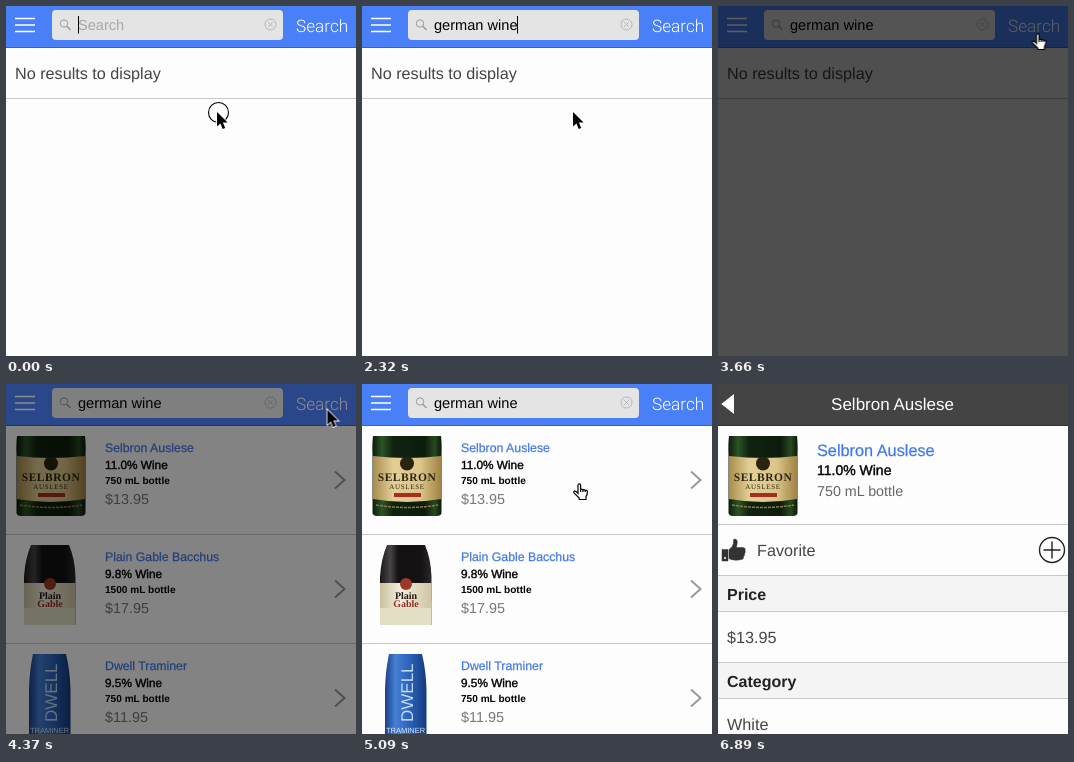
Animation, 350 px wide and 350 px high, one loop 7.92 s. Source, as an HTML page:

```html
<!DOCTYPE html>
<html lang="en">
<head>
<meta charset="utf-8">
<title>Wine search</title>
<style>
html, body { margin: 0; width: 100%; height: 100%; overflow: hidden; background: #fdfdfd; }
svg { display: block; width: 100vw; height: 100vh; }
text { font-family: "Liberation Sans", Arial, sans-serif; text-rendering: geometricPrecision; white-space: pre; }
.serif { font-family: "Liberation Serif", "Noto Serif", serif; }
.light { font: 300 17.2px Roboto, "Liberation Sans", sans-serif; fill: #fff; }
.field { font-size: 14.6px; }
.body { font-size: 16.2px; fill: #444; }
.head { font-size: 16px; font-weight: 700; fill: #222; }
.name { font-size: 12.3px; fill: #4379e8; stroke: #4379e8; stroke-width: .25px; }
.kind { font-size: 11.8px; fill: #000; stroke: #000; stroke-width: .4px; }
.size { font-size: 10.1px; font-weight: 700; }
.price { font-size: 14.4px; fill: #777; }
.rule { stroke: #c9c9c9; }

/* every track shares one 7920 ms clock */
.t { animation: 7920ms step-end infinite; }
.press { animation-name: press; }
.hint { animation-name: hint; }
.edit { animation-name: edit; }
.caret { animation-name: caret; }
.results { animation-name: results; }
.active { animation-name: active; }
.dim { animation-name: dim; }
.app { animation-name: app; }
.detail { animation-name: detail; }
.pointer { animation-name: pointer; }
.hand { animation-name: hand; }
.arrow { animation-name: arrow; }

@keyframes press { 0% { opacity: 1 } 1.13%, 100% { opacity: 0 } }
@keyframes hint { 0% { opacity: 1 } 6.69%, 100% { opacity: 0 } }
@keyframes caret {
  0% { opacity: 1 } 3.4% { opacity: 0 } 6.69% { opacity: 1 }
  34.95%, 100% { opacity: 0 }
}
@keyframes edit {
  0% { transform: none }
  6.69% { transform: translateX(8px) }
  8.96% { transform: translateX(16px) }
  11.23% { transform: translateX(21px) }
  12.37% { transform: translateX(33px) }
  18.05% { transform: translateX(41px) }
  20.32% { transform: translateX(49px) }
  22.6% { transform: translateX(53px) }
  24.87% { transform: translateX(64px) }
  25.88% { transform: translateX(67px) }
  27.01% { transform: translateX(75px) }
  29.29%, 100% { transform: translateX(83px) }
}
@keyframes dim {
  0% { opacity: 0 }
  43.9% { opacity: .36 } 45.05% { opacity: .72 } 46.2% { opacity: 1 }
  55.16% { opacity: .7 } 56.3% { opacity: .4 } 57.44% { opacity: .16 }
  58.56%, 100% { opacity: 0 }
}
@keyframes results { 0% { opacity: 0 } 55.16%, 100% { opacity: 1 } }
@keyframes active { 0% { opacity: 0 } 68.8%, 100% { opacity: 1 } }
@keyframes app {
  0% { transform: none }
  71.07% { transform: translateX(-5px) }
  72.21% { transform: translateX(-18px) }
  73.34% { transform: translateX(-46px) }
  74.48%, 100% { transform: translateX(-59px) }
}
@keyframes detail {
  0% { transform: translateX(360px) }
  71.07% { transform: translateX(322px) }
  72.21% { transform: translateX(243px) }
  73.34% { transform: translateX(75px) }
  74.48%, 100% { transform: none }
}
@keyframes pointer {
  0% { transform: translate(211px, 106px) }
  34.95% { transform: translate(211px, 106px); animation-timing-function: steps(9, start) }
  45% { transform: translate(321.5px, 26px) }
  58.56% { transform: translate(321.5px, 26px); animation-timing-function: steps(6, start) }
  65.38% { transform: translate(219px, 98px) }
  77.88% { transform: translate(219px, 98px); animation-timing-function: steps(9, start) }
  87.93%, 100% { transform: translate(360px, 360px) }
}
@keyframes hand {
  0% { opacity: 0 } 42.7% { opacity: 1 } 50.62% { opacity: 0 }
  59.68% { opacity: 1 } 77.88%, 100% { opacity: 0 }
}
@keyframes arrow {
  0% { opacity: 1 } 42.7% { opacity: 0 } 50.62% { opacity: 1 }
  59.68% { opacity: 0 } 77.88%, 100% { opacity: 1 }
}
</style>
</head>
<body>
<svg viewBox="0 0 350 350">
  <defs>
    <linearGradient id="green">
      <stop offset="0" stop-color="#0c1a0c"/><stop offset=".14" stop-color="#2c5426"/>
      <stop offset=".3" stop-color="#10230f"/><stop offset=".75" stop-color="#0d1c0d"/>
      <stop offset=".9" stop-color="#27491f"/><stop offset="1" stop-color="#0c170b"/>
    </linearGradient>
    <linearGradient id="gold">
      <stop offset="0" stop-color="#a98c4c"/><stop offset=".3" stop-color="#e2cf96"/>
      <stop offset=".7" stop-color="#dcc588"/><stop offset="1" stop-color="#a08344"/>
    </linearGradient>
    <linearGradient id="black">
      <stop offset="0" stop-color="#1a1718"/><stop offset=".2" stop-color="#4b4546"/>
      <stop offset=".35" stop-color="#151213"/><stop offset=".8" stop-color="#151213"/>
      <stop offset="1" stop-color="#2d292a"/>
    </linearGradient>
    <linearGradient id="cream">
      <stop offset="0" stop-color="#c9c0a0"/><stop offset=".4" stop-color="#f3eedc"/>
      <stop offset="1" stop-color="#cfc5a3"/>
    </linearGradient>
    <linearGradient id="blue">
      <stop offset="0" stop-color="#1a3f88"/><stop offset=".25" stop-color="#4580d4"/>
      <stop offset=".6" stop-color="#2a62ba"/><stop offset="1" stop-color="#173a7c"/>
    </linearGradient>
    <g id="sekt">
      <path d="M11 52H79Q80 60 79.500 72V129Q79 132 75 132H15Q11 132 10.500 129V72Q10 60 11 52Z" fill="url(#green)"/>
      <path d="M11 72Q45 76 79 72V115Q45 121 11 115Z" fill="url(#gold)"/>
      <circle cx="45" cy="79.500" r="7" fill="#29230f"/>
      <g text-anchor="middle" fill="#2c2412">
        <text class="serif" x="45" y="97" font-size="11.500" font-weight="700" letter-spacing=".5">SELBRON</text>
        <text class="serif" x="45" y="104.500" font-size="7" letter-spacing=".7">AUSLESE</text>
      </g>
      <rect x="32" y="109" width="27" height="4" fill="#a32f22"/>
      <path d="M14 121Q45 126 76 121" fill="none" stroke="#8d7a48" stroke-width="1.500" stroke-dasharray="3 1"/>
    </g>
    <path id="more" d="M329 87.500L338.500 96L329 104.500" fill="none" stroke="#999" stroke-width="2"/>
  </defs>

  <g class="t app">
    <rect width="350" height="350" fill="#fdfdfd"/>
    <text class="body" x="9" y="73">No results to display</text>
    <path class="rule" d="M0 92.500H350"/>

    <g class="t results">
      <rect y="42" width="350" height="308" fill="#fdfdfd"/>
      <rect class="t active" y="42" width="350" height="108" fill="#d9d9d9"/>
      <path class="rule" d="M0 150.500H350M0 259.500H350"/>
      <g>
        <use href="#sekt"/>
        <text class="name" x="99" y="68">Selbron Auslese</text>
        <text class="kind" x="99" y="85">11.0% Wine</text>
        <text class="size" x="99" y="100">750 mL bottle</text>
        <text class="price" x="99" y="120">$13.95</text>
        <use href="#more"/>
      </g>
      <g transform="translate(0 109)">
        <rect x="18" y="52" width="51.500" height="80" fill="#fdfdfd"/>
        <path d="M25 52H63Q69 66 69.500 84V132H18V84Q19 66 25 52Z" fill="url(#black)"/>
        <path d="M18 108H69.500V132H18Z" fill="#e2dfc4"/>
        <path d="M18 90H69.500V115H18Z" fill="url(#cream)"/>
        <circle cx="44" cy="91" r="6" fill="#9b3a2c"/>
        <g text-anchor="middle" fill="#231a16">
          <text class="serif" x="44" y="105.500" font-size="10" font-weight="700">Plain</text>
          <text class="serif" x="44" y="113.500" font-size="10" font-weight="700" style="fill:#9b2c24">Gable</text>
        </g>
        <text class="name" x="99" y="68">Plain Gable Bacchus</text>
        <text class="kind" x="99" y="85">9.8% Wine</text>
        <text class="size" x="99" y="100">1500 mL bottle</text>
        <text class="price" x="99" y="120">$17.95</text>
        <use href="#more"/>
      </g>
      <g transform="translate(0 218)">
        <rect x="23" y="52" width="42" height="80" fill="#fdfdfd"/>
        <path d="M27 52H60Q64 68 64.500 88V132H23V88Q23.500 68 27 52Z" fill="url(#blue)"/>
        <text transform="translate(51 120) rotate(-90)" font-size="17" fill="#c6daf4">DWELL</text>
        <text x="43.500" y="131" font-size="7.500" fill="#dbe8f7" text-anchor="middle">TRAMINER</text>
        <text class="name" x="99" y="68">Dwell Traminer</text>
        <text class="kind" x="99" y="85">9.5% Wine</text>
        <text class="size" x="99" y="100">750 mL bottle</text>
        <text class="price" x="99" y="120">$11.95</text>
        <use href="#more"/>
      </g>
    </g>

    <rect width="350" height="42" fill="#4a80f7"/>
    <path d="M0 41.500H350" stroke="#3562c0"/>
    <path d="M9 12.500H29M9 19H29M9 25.500H29" stroke="#fff" stroke-width="1.700"/>
    <rect x="46" y="4" width="231" height="30" rx="4" fill="#e4e4e4"/>
    <g fill="none" stroke="#9a9a9a">
      <circle cx="58" cy="17.500" r="3.700"/>
      <path d="M60.700 20.200L64.500 24" stroke-width="1.500"/>
    </g>
    <text class="field" x="72" y="24">german wine</text>
    <g class="t edit">
      <rect x="72" y="8" width="88" height="22" fill="#e4e4e4"/>
      <rect class="t caret" x="72" y="10" width="1" height="17.500"/>
    </g>
    <text class="t hint field" x="72" y="24" fill="#a8a8a8">Search</text>
    <g fill="none" stroke="#b3b3b3">
      <circle cx="264.500" cy="18.500" r="5.500"/>
      <path d="M262.300 16.300L266.700 20.700M266.700 16.300L262.300 20.700"/>
    </g>
    <text class="light" x="290" y="26">Search</text>

    <g class="t dim">
      <rect width="350" height="42" fill-opacity=".63"/>
      <rect y="42" width="350" height="308" fill-opacity=".69"/>
    </g>
  </g>

  <g class="t detail">
    <rect x="-7" width="357" height="350" fill="#fdfdfd"/>
    <path d="M-7 191H350V227H-7ZM-7 278H350V314H-7Z" fill="#f4f4f4"/>
    <path class="rule" d="M-6.500 42V350M-7 140.500H350M-7 191.500H350M-7 227.500H350M-7 278.500H350M-7 314.500H350"/>
    <rect x="-6" width="356" height="42" fill="#444"/>
    <path d="M-6 41.500H350" stroke="#333"/>
    <path d="M3.300 20L16 10V30Z" fill="#fff"/>
    <text x="174.500" y="26" font-size="17" fill="#fff" text-anchor="middle">Selbron Auslese</text>
    <use href="#sekt"/>
    <text class="name" x="99" y="72" style="font-size:16.300px">Selbron Auslese</text>
    <text class="kind" x="99" y="91" style="font-size:14px">11.0% Wine</text>
    <text x="99" y="112" font-size="14.300" fill="#666">750 mL bottle</text>
    <g transform="translate(4 154.500)" fill="#333">
      <path d="M0 11H6V22.500H0ZM7 11Q11 8 11.500 5V1.500Q12 0 13.500 .5Q16 1.500 15 6L14.300 9H21Q24 9.500 23 12Q24 13.500 22.600 15Q23 17 21.500 18Q22 20.500 19.500 21Q14 22.500 9 21L7 20Z" stroke="#333" stroke-width=".5"/>
      <circle cx="3" cy="19.500" r="1" fill="#fdfdfd"/>
    </g>
    <text class="body" x="39" y="172">Favorite</text>
    <g fill="none" stroke="#222" stroke-width="1.400">
      <circle cx="334" cy="166" r="12.500"/>
      <path d="M325.500 166H342.500M334 157.500V174.500"/>
    </g>
    <text class="head" x="9" y="216">Price</text>
    <text class="body" x="9" y="259">$13.95</text>
    <text class="head" x="9" y="303">Category</text>
    <text class="body" x="9" y="346">White</text>
  </g>

  <circle class="t press" cx="212.500" cy="106.500" r="10" fill="none" stroke="#000" stroke-width="1.100"/>
  <g class="t pointer">
    <path class="t arrow" d="M0 0V14.500L3.400 11.400L5.700 17L8.200 16L5.900 10.600H10.600Z" stroke="#fff" stroke-width="1.600" paint-order="stroke"/>
    <g class="t hand">
      <path transform="translate(-8 1)" d="M5 10.400V2.300Q5 .8 6.300 .8Q7.600 .8 7.600 2.300V6.600Q8.600 5.600 9.900 6.800Q11.200 6 12.200 7.400Q14.400 7 14.400 9Q14.400 12 13 13.600V16.500H6.200V15L1 10Q.2 8.600 1.600 8.200Q3 8 5 10.400ZM7.600 6.600V9M9.900 6.800V9M12.200 7.400V9" fill="#fff" stroke="#000" stroke-width="1.200"/>
    </g>
  </g>
</svg>
</body>
</html>
```
